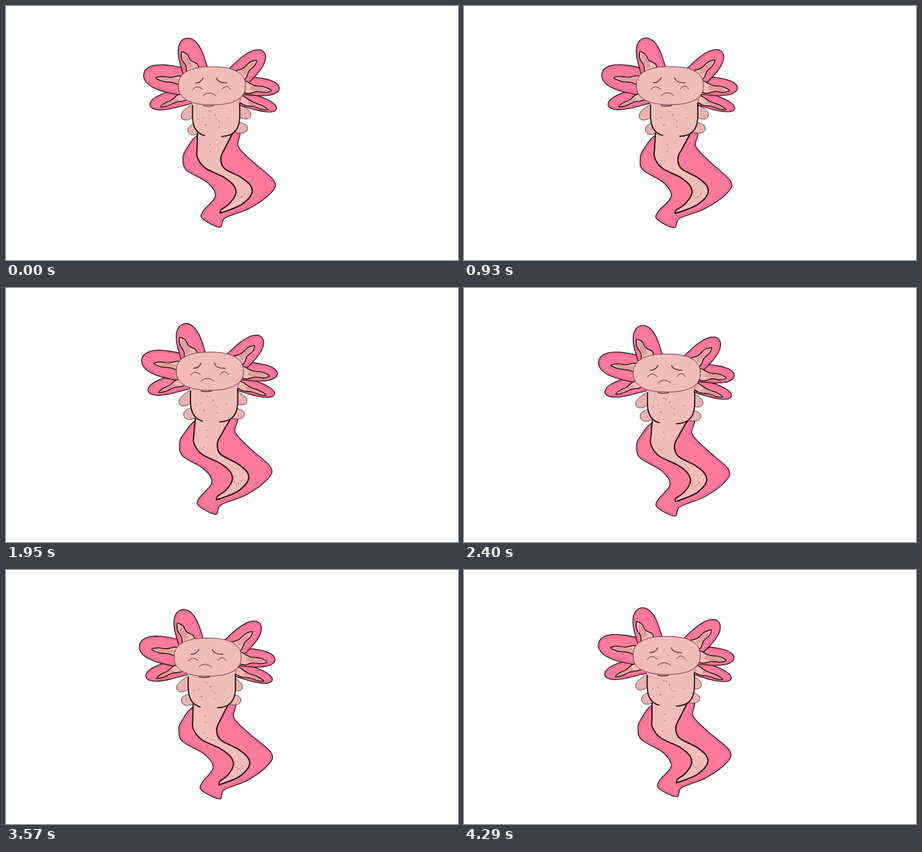
These frames come from a looping animation (640 by 360 pixels, 4.32 s). An HTML page with a canvas:

```html
<!DOCTYPE html>
<html lang="en">
<head>
<meta charset="utf-8">
<title>Axolotl</title>
<style>
html, body { margin: 0; width: 100%; height: 100%; overflow: hidden; background: #fff; }
canvas { display: block; width: 640px; height: 360px; }
</style>
</head>
<body>
<canvas id="stage" width="640" height="360"></canvas>
<script>
const ctx = document.getElementById('stage').getContext('2d');
const LOOP = 4320, STEP = 30, PI = Math.PI;
const PINK = '#fe7a9b', SKIN = '#f1bbb9', BLUSH = '#e39a9b', SHADE = '#d4607f', INK = '#1c0e0c', LINE = '#6d3844';

const pts = s => s.split(' ').map(p => p.split(',').map(Number));
const range = (n, f) => Array.from({ length: n + 1 }, (_, i) => f(i));

let seed = 11;
const rand = () => (seed = seed * 16807 % 2147483647) / 2147483647;

// Maps (u along, v across) onto the axis from base to tip
function axis([x0, y0, x1, y1]) {
  const dx = x1 - x0, dy = y1 - y0, len = Math.hypot(dx, dy);
  return (u, v) => [x0 + dx * u - dy / len * v, y0 + dy * u + dx / len * v];
}

// Blunt rounded lobe
function lobe(line, w) {
  const at = axis(line);
  return range(16, i => {
    const a = PI * (i / 16 - .5);
    return at(Math.max(0, Math.cos(a)) ** .5, w * Math.sin(a));
  });
}

// Pointed leaf with wavy edges
function leaf(line, w) {
  const at = axis(line);
  return range(16, i => {
    const k = i / 8 - 1, r = Math.abs(k);
    return at(1 - r, Math.sign(k) * w * r ** .6 * (1 + .25 * Math.sin(9 * r + k)));
  });
}

// Part of a superellipse
function oval(cx, cy, rx, ry, n, from = 0, to = 2 * PI) {
  const pow = v => Math.sign(v) * Math.abs(v) ** (2 / n);
  return range(40, i => {
    const a = from + (to - from) * i / 40;
    return [cx + rx * pow(Math.cos(a)), cy + ry * pow(Math.sin(a))];
  });
}

// Gills from back to front: lobe axis and half width, leaf axis and half width
const gills = [
  [[260, 126, 204, 141], 12.5, [252, 128, 219, 143], 5],
  [[258, 109, 195, 96], 19.5, [254, 107, 212, 102], 6.5],
  [[270, 98, 254, 46], 18, [266, 94, 249, 65], 9.5],
  [[326, 128, 383, 146], 10.5, [333, 133, 371, 147], 5],
  [[330, 112, 387, 117], 13, [336, 115, 376, 120], 7.5],
  [[318, 110, 365, 65], 17, [328, 101, 355, 77], 8]
].map(([a, w, b, v]) => ({
  lobe: lobe(a, w),
  leaf: leaf(b, v),
  blush: lobe([.25, .85].flatMap(u => axis(b)(u, 0)), v * .4)
}));

const HEAD = [291.5, 113, 47.5, 27, 2.4], BODY = [297.5, 150, 33.5, 35, 3];
const head = oval(...HEAD), body = oval(...BODY);
const flanks = [oval(...BODY, PI + .13, PI / 2 + .35), oval(...BODY, -.2, PI / 2 - .12)];
const armL = lobe([268, 146, 249, 159], 8), armR = lobe([326, 146, 346, 157], 8);
const legL = lobe([275, 172, 258, 178], 8), legR = lobe([323, 172, 342, 174], 7.5);

const fin = pts('276,181 255,204 251,218 256,233 286,251 297,270 280,291 279,302 304,314 311,301 346,287 376,265 380,248 350,221 329,199 328,178');
const spine = pts('296,180 291,200 288,215 296,230 321,243 335,255 337,267 326,281 312,289 304,294');
const edge = side => spine.map(([x, y]) => {
  const u = (y - 180) / 114;
  const half = (12 + 13 * Math.max(0, 1 - 2 * u) ** 1.1) * Math.sqrt(1 - u ** 8);
  return [x + side * half, y];
});
const tailL = edge(-1), tailR = edge(1).reverse();

// Start, control and end of each facial stroke
const eyes = ['264,119 270,110 278,118', '306,118 312,109 318,118', '279,127 288,119 297,127'].map(pts);
const brows = ['268,109 276,109 279,102', '298,102 300,109 313,109', '279,141 286,143 294,141'].map(pts);

const scatter = (n, x, y, w, h) => range(n, () => [x + w * rand(), y + h * rand()]);
const dots = [...scatter(11, 272, 147, 50, 30), ...scatter(5, 328, 258, 12, 18), ...scatter(2, 276, 196, 14, 30)];

let bend, bow, drop;

// Flexes everything below the hips
function warp([x, y]) {
  const u = (y - 182) / 132;
  if (u <= 0) return [x, y];
  const bump = 9 * u * Math.max(0, 1 - u) ** 3;
  return [x + bend * u ** 1.6 + bow * bump, y + drop * Math.min(1, u)];
}

// Catmull-Rom curve through the points
function curve(p, closed, move = true) {
  const q = p.map(warp), n = q.length;
  const at = i => closed ? q[(i + n) % n] : q[Math.max(0, Math.min(n - 1, i))];
  if (move) ctx.moveTo(...q[0]); else ctx.lineTo(...q[0]);
  for (let i = 0; i < (closed ? n : n - 1); i++) {
    const [a, b, c, d] = [at(i - 1), at(i), at(i + 1), at(i + 2)];
    ctx.bezierCurveTo(b[0] + (c[0] - a[0]) / 6, b[1] + (c[1] - a[1]) / 6,
      c[0] - (d[0] - b[0]) / 6, c[1] - (d[1] - b[1]) / 6, c[0], c[1]);
  }
}

function stroke(color, width) {
  ctx.strokeStyle = color;
  ctx.lineWidth = width;
  ctx.stroke();
}

function line(p, color, width) {
  ctx.beginPath();
  curve(p, false);
  stroke(color, width);
}

function arc([a, c, b], color, width) {
  ctx.beginPath();
  ctx.moveTo(...a);
  ctx.quadraticCurveTo(...c, ...b);
  stroke(color, width);
}

function shape(p, fill, color, width, closed = false) {
  ctx.beginPath();
  curve(p, closed);
  ctx.fillStyle = fill;
  ctx.fill();
  if (width) stroke(color, width);
}

// Filled shape with a darker rim inside its edge
function rimmed(p, closed) {
  shape(p, PINK, 0, 0, closed);
  ctx.save();
  ctx.clip();
  ctx.globalAlpha = .4;
  stroke(SHADE, 7);
  ctx.restore();
  stroke(INK, 1.1);
}

function limb(p, dx, dy) {
  shape(p.map(([x, y]) => [x + dx, y + dy]), '#e9b2b0', '#5b363a', .9);
}

function draw(t) {
  const wave = (peak, half) => Math.cos(PI * (t - peak) / half);
  const sway = (1 - wave(500, 2900)) / 2 - .07;
  const kick = (1 - wave(0, 2750)) / 2;
  const lean = (1 - wave(0, 4000)) / 2;
  bend = -1.2 - 5.9 * wave(1200, 2350);
  bow = -1.2 - wave(2200, 2200);
  drop = .6 + 1.2 * wave(2150, 2150);

  ctx.fillStyle = '#fff';
  ctx.fillRect(0, 0, 640, 360);
  ctx.save();
  ctx.translate(-6.5 * sway, 11.3 * sway);
  ctx.lineCap = ctx.lineJoin = 'round';

  rimmed(fin, true);
  limb(legL, -4 * kick, -1.5 * kick);
  limb(legR, -3.5 * lean, kick);
  limb(armL, -.5 * kick, kick);
  limb(armR, -6 * lean, kick);

  ctx.beginPath();
  curve(tailL, false);
  curve(tailR, false, false);
  ctx.fillStyle = SKIN;
  ctx.fill();
  line(tailL, INK, 1.7);
  line(tailR, INK, 1.8);

  gills.forEach(g => rimmed(g.lobe));
  for (const g of gills) {
    shape(g.leaf, SKIN, INK, 1.3);
    shape(g.blush, BLUSH);
  }

  shape(body, SKIN);
  shape(head, SKIN, LINE, .9);
  flanks.forEach(p => line(p, INK, 1.6));
  eyes.forEach(p => arc(p, LINE, 1));
  brows.forEach(p => arc(p, '#4a242a', 1.2));

  ctx.fillStyle = '#6b3a3a';
  for (const d of dots) {
    const [x, y] = warp(d);
    ctx.fillRect(x - .5, y - .5, 1, 1);
  }
  ctx.restore();
}

function tick() {
  const t = performance.now() % LOOP;
  draw(Math.floor(t / STEP) * STEP);
  requestAnimationFrame(tick);
}
tick();
</script>
</body>
</html>
```
